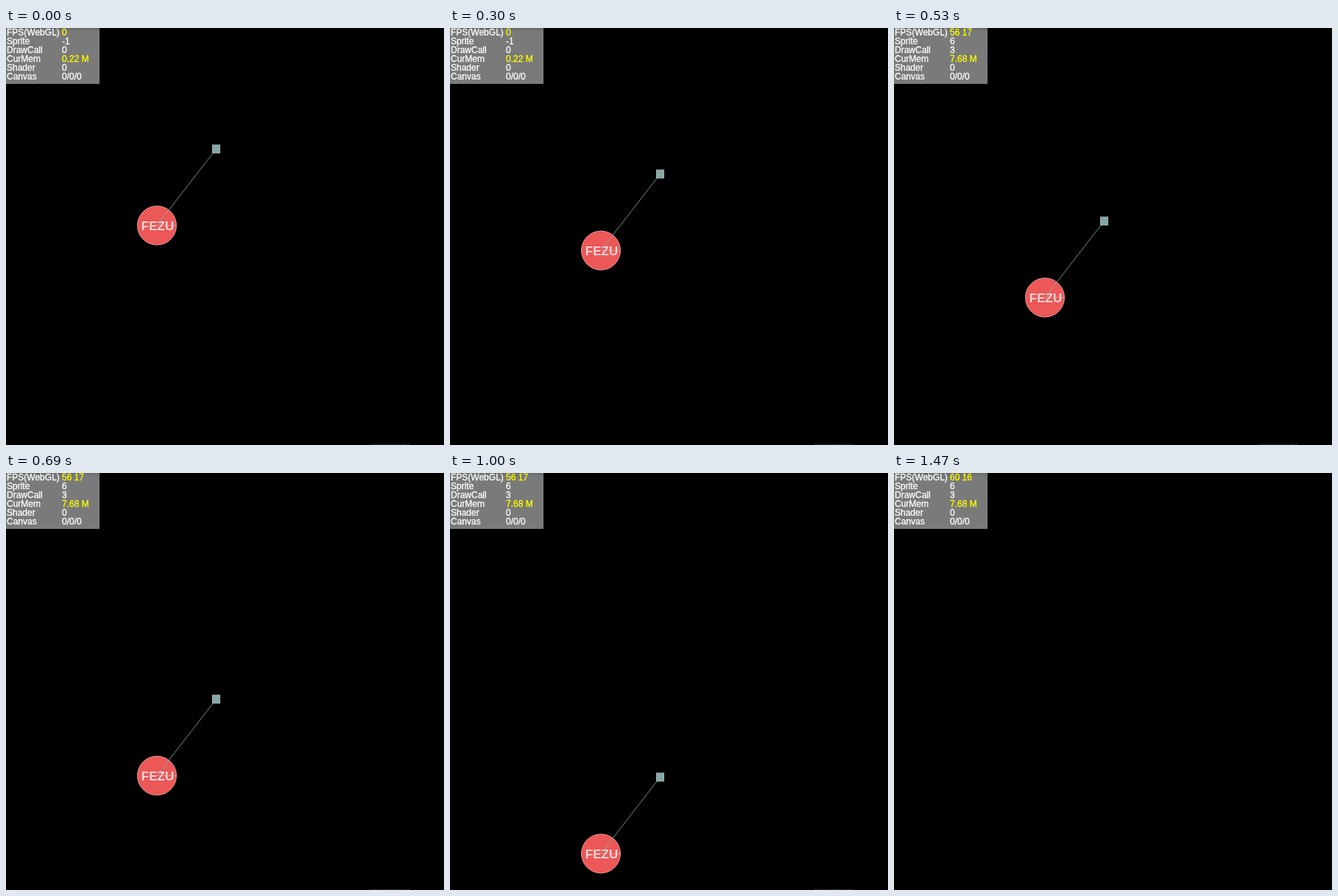
An HTML page for the animation above (1.62 s loop, 595 px wide and 567 px high).

```html
<!DOCTYPE html>
<html lang="en">
<head>
<meta charset="utf-8">
<title>Falling joint</title>
<style>
  html, body { margin: 0; width: 100%; height: 100%; overflow: hidden; background: #000; }
  svg { display: block; width: 595px; height: 567px; }
  text { font-family: Arial, "Liberation Sans", sans-serif; }
  #stats text { font-size: 12px; fill: #fff; stroke: #fff; stroke-width: 0.3px; white-space: pre; }
  #stats .hot { fill: #ff0; stroke: #ff0; }
</style>
</head>
<body>
<svg viewBox="0 0 595 567">
  <defs>
    <linearGradient id="panel" x1="0" y1="0" x2="0" y2="1">
      <stop offset="0" stop-color="#686868"/>
      <stop offset="0.06" stop-color="#7a7a7a"/>
    </linearGradient>
  </defs>
  <rect width="595" height="567"/>
  <path id="edge" d="M495 566.5H548" stroke="#3c3c3c" stroke-dasharray="2 1"/>
  <g id="bodies">
    <circle cx="205" cy="268.5" r="26.5" fill="#ec5757" stroke="#e89a96"/>
    <text x="206" y="274.5" font-size="17" font-weight="bold" text-anchor="middle" fill="#e8d6d6">FEZU</text>
    <path d="M205 268.5H231" stroke="#e6b3b3" stroke-opacity="0.6"/>
    <rect x="280.5" y="159" width="10" height="11" fill="#84a6a6" stroke="#a9b2b2"/>
    <path d="M205 268.5L285.5 164.5" stroke="#80b8a8" stroke-width="0.8"/>
  </g>
  <g id="stats"><rect width="127" height="76" fill="url(#panel)"/></g>
</svg>
<script>
  const LOOP = 1620;
  const STEPS = [0, 70, 150, 230, 310, 380, 460, 530, 610, 690,
                 770, 840, 920, 1000, 1070, 1150, 1230, 1310, 1390, 1470];
  // Time in ms and distance fallen in px
  const FALL = [[0, 0], [150, 21], [380, 63], [690, 143], [840, 190], [1150, 310], [1470, 511]];
  const ROWS = ["FPS(WebGL)", "Sprite", "DrawCall", "CurMem", "Shader", "Canvas"];
  const START = ["0", "-1", "0", "0.22 M", "0", "0/0/0"];
  const RUNNING = ["56 17", "6", "3", "7.68 M", "0", "0/0/0"];
  const LATE = ["60 16", ...RUNNING.slice(1)];

  const byId = id => document.getElementById(id);
  const stats = byId("stats"), bodies = byId("bodies"), edge = byId("edge");

  function addText(x, y, label, hot) {
    const node = document.createElementNS("http://www.w3.org/2000/svg", "text");
    node.setAttribute("x", x);
    node.setAttribute("y", y);
    if (hot) node.setAttribute("class", "hot");
    node.textContent = label;
    stats.appendChild(node);
    return node;
  }

  const values = ROWS.map((label, i) => {
    const y = 10 + 12 * i;
    addText(1, y, label);
    return addText(76, y, "", i === 0 || i === 3);
  });

  // Under constant gravity the root of the total drop grows linearly
  const DROP = 22.5;
  const root = d => Math.sqrt(d + DROP);

  function fallen(t) {
    let i = 0;
    while (i < FALL.length - 2 && t >= FALL[i + 1][0]) i++;
    const [t0, d0] = FALL[i], [t1, d1] = FALL[i + 1];
    const r = root(d0) + (root(d1) - root(d0)) * (t - t0) / (t1 - t0);
    return Math.round(r * r - DROP);
  }

  function draw(ms) {
    const now = ms % LOOP;
    const t = STEPS.filter(s => s <= now).pop();
    bodies.setAttribute("transform", `translate(0 ${fallen(t)})`);
    bodies.setAttribute("visibility", t < 1390 ? "visible" : "hidden");
    edge.setAttribute("visibility", t < 1470 ? "visible" : "hidden");
    const data = t < 460 ? START : t < 1470 ? RUNNING : LATE;
    values.forEach((node, i) => {
      if (node.textContent !== data[i]) node.textContent = data[i];
    });
  }

  const begin = performance.now();
  function tick() {
    draw(performance.now() - begin);
    requestAnimationFrame(tick);
  }
  tick();
</script>
</body>
</html>
```
